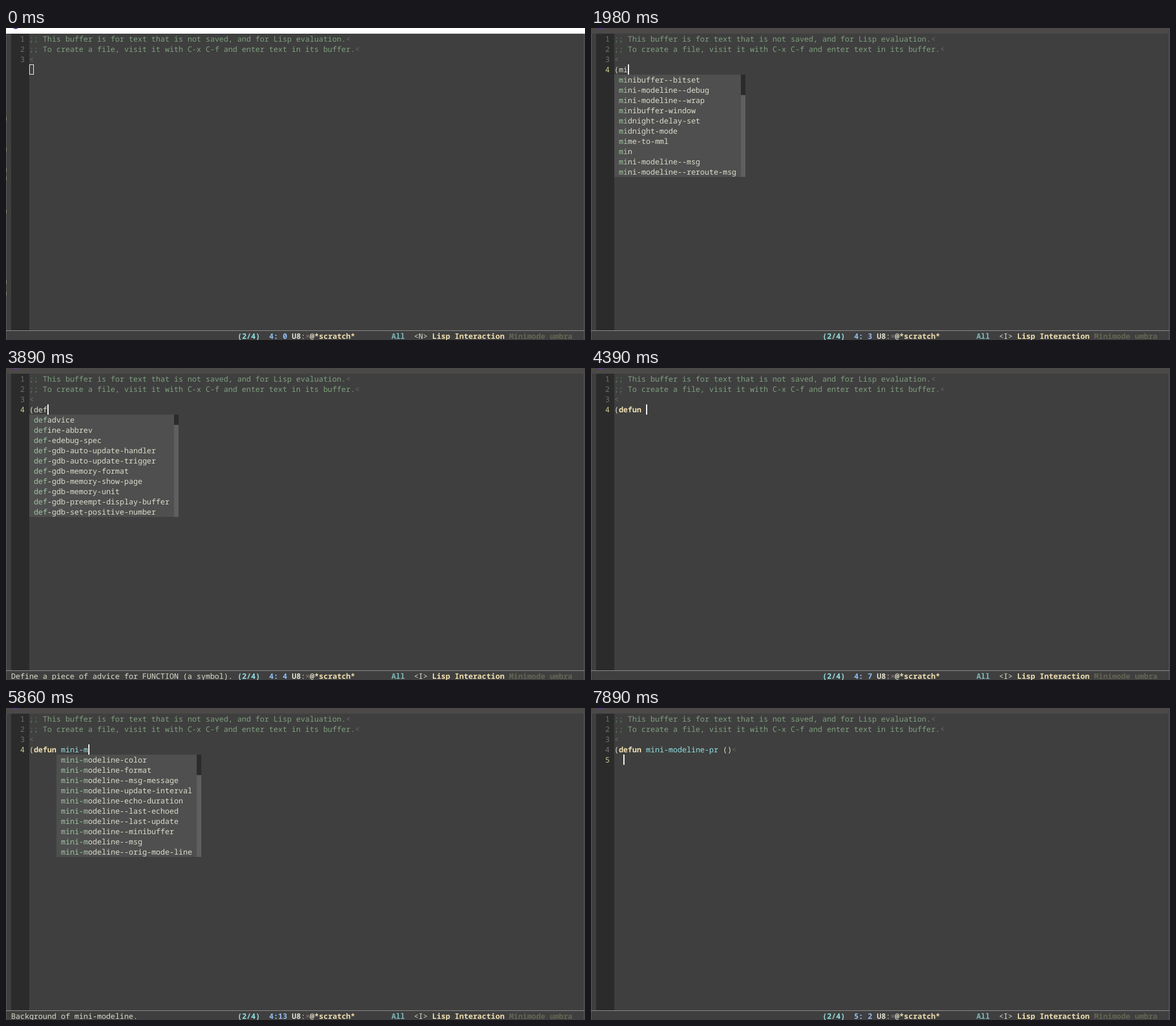
An HTML page that plays this animation: 1020x549 px, repeating every 8 s.

```html
<!DOCTYPE html>
<html lang="en">
<head>
<meta charset="utf-8">
<title>Editor</title>
<style>
  html, body { margin: 0; width: 100%; height: 100%; overflow: hidden; background: #3f3f3f; }
  #stage { position: absolute; left: 0; top: 0; width: 1020px; height: 549px; overflow: hidden; }
  #stage * { position: absolute; }
  #stage span {
    font: 13.29px/18px "Noto Sans Mono", monospace;
    white-space: pre;
    text-rendering: geometricPrecision;
  }
  #stage span.b { font-weight: 700; }
</style>
</head>
<body>
<div id="stage"></div>
<script>
const LOOP = 8000, CELL = 7.975, LEFT = 9, ROW = 18, TOP = 10;
const C = {
  fg: '#dcdccc', dim: '#6f6f6f', eol: '#686b68', comment: '#7f9f7f', delim: '#5f7f5f',
  key: '#f0dfaf', name: '#93e0e3', match: '#9fc59f', line: '#d0d08f', pos: '#94bff3',
  all: '#7cb8bb', minor: '#656555', popup: '#4f4f4f', track: '#5f5f5f', dark: '#2b2b2b'
};

const mm = s => s.split(' ').map(w => w.replace('~', 'mini-modeline-'));
const miFns = mm('minibuffer--bitset ~-debug ~-wrap minibuffer-window midnight-delay-set midnight-mode mime-to-mml min ~-msg ~-reroute-msg');
const minFns = mm('minibuffer--bitset ~-debug ~-wrap minibuffer-window ~-msg ~-reroute-msg ~-set-buffer-background ~-window-divider ~disable ~display');
const defFns = mm('defadvice define-abbrev def-edebug-spec def-gdb-auto-update-handler def-gdb-auto-update-trigger def-gdb-memory-format def-gdb-memory-show-page def-gdb-memory-unit def-gdb-preempt-display-buffer def-gdb-set-positive-number');
const defuns = mm('defun defun-cvs-mode');
const miVars = mm('~color ~format ~-msg-message ~update-interval ~echo-duration midnight-mode ~-last-echoed ~-last-update ~-minibuffer ~-msg');
const miniVars = miVars.filter(w => w !== 'midnight-mode').concat(mm('~-orig-mode-line'));
const truncP = mm('~truncate-p');

const advice = 'Define a piece of advice for FUNCTION (a symbol).';
const defDoc = 'Define NAME as a function.';
const colorDoc = 'Background of mini-modeline.';
const truncDoc = 'Truncates mini-modeline or not.';

// [start, typed text, cursor, popup, message]
const steps = [
  [0, '', 'hollow'],
  [150, '', 'hollow'],
  [220, '', 'block'],
  [1180, '', 'bar'],
  [1520, '('],
  [1840, '(m'],
  [1910, '(mi'],
  [1980, '(mi', 'bar', miFns],
  [2150, '(min', 'bar', minFns],
  [2230, '(mini', 'bar', minFns],
  [3010, '(min', 'bar', minFns],
  [3180, '(mi', 'bar', miFns],
  [3350, '(m'],
  [3520, '('],
  [3660, '(d'],
  [3740, '(de'],
  [3820, '(def'],
  [3890, '(def', 'bar', defFns, advice],
  [4060, '(defu', 'bar', defuns, advice],
  [4140, '(defun', 'bar', defuns, advice],
  [4230, '(defun', 'bar', defuns, defDoc],
  [4390, '(defun '],
  [4940, '(defun m'],
  [5080, '(defun mi'],
  [5150, '(defun mi', 'bar', miVars, colorDoc],
  [5230, '(defun min', 'bar', miniVars, colorDoc],
  [5310, '(defun mini', 'bar', miniVars, colorDoc],
  [5630, '(defun mini-', 'bar', miniVars, colorDoc],
  [5860, '(defun mini-m', 'bar', miniVars, colorDoc],
  [5950, '(defun mini-mo', 'bar', miniVars, colorDoc],
  [6260, '(defun mini-modeline-', 'bar', miniVars, colorDoc],
  [6640, '(defun mini-modeline-p', 'bar', truncP, truncDoc],
  [6720, '(defun mini-modeline-pr', 'bar', null, truncDoc],
  [6800, '(defun mini-modeline-pr'],
  [7270, '(defun mini-modeline-pr '],
  [7500, '(defun mini-modeline-pr ('],
  [7570, '(defun mini-modeline-pr ()'],
  [7890, '(defun mini-modeline-pr ()\n  ']
];

const stage = document.getElementById('stage');
const X = col => LEFT + col * CELL;
const Y = row => TOP + row * ROW;

function box(x, y, w, h, color, extra = '') {
  const el = document.createElement('div');
  el.style.cssText = `left:${x}px;top:${y}px;width:${w}px;height:${h}px;background:${color};${extra}`;
  stage.append(el);
}

function text(col, y, str, color, bold) {
  if (!str) return;
  const el = document.createElement('span');
  el.textContent = str;
  el.style.cssText = `left:${X(col)}px;top:${y}px;color:${color}`;
  if (bold) el.className = 'b';
  stage.append(el);
}

function drawWindow(focused) {
  box(0, 0, 1020, TOP, focused ? '#4b4948' : '#ffffff');
  box(10, -12, 14, 14, focused ? '#6a35b0' : '#7f3fbf', 'border-radius:50%');
  box(0, TOP, 1, 539, '#5c5c5c');
  box(1018, TOP, 1, 539, '#5c5c5c');
  box(LEFT, TOP, 32, 522, C.dark);
  box(0, 532, 1019, 1, '#949494');
  if (!focused) {
    for (const y of [157, 211, 247, 262, 320, 444, 464]) box(0, y, 1, 6, '#a09a80');
  }
}

function drawComments() {
  const lines = [
    'This buffer is for text that is not saved, and for Lisp evaluation.',
    'To create a file, visit it with C-x C-f and enter text in its buffer.'
  ];
  lines.forEach((s, i) => {
    text(4, Y(i), ';;', C.delim);
    text(7, Y(i), s, C.comment);
    text(7 + s.length, Y(i), '<', C.eol);
  });
  text(4, Y(2), '<', C.eol);
  for (let i = 0; i < 3; i++) text(2, Y(i), String(i + 1), C.dim);
}

function drawCode(code, newline) {
  const [, paren, key, name, rest] = code.match(/^(\(?)(\w*)( ?[\w-]*)(.*)$/);
  const isDef = key === 'defun';
  text(4, Y(3), paren, C.fg);
  text(5, Y(3), key, isDef ? C.key : C.fg, isDef);
  text(5 + key.length, Y(3), name, C.name);
  text(5 + key.length + name.length, Y(3), rest, C.fg);
  if (newline) text(4 + code.length, Y(3), '<', C.eol);
}

function drawCursor(kind, col, row) {
  const x = Math.round(X(col)), y = Y(row);
  if (kind === 'hollow') box(x, y, 8, ROW, 'none', 'box-sizing:border-box;border:1px solid #fff');
  else box(x, y, kind === 'block' ? 8 : 2, ROW, '#fff');
}

function drawPopup(list, code) {
  const prefix = code.match(/[\w-]*$/)[0].length;
  const col = 4 + code.length - prefix;
  const wide = Math.max(...list.map(w => w.length));
  const x = Math.round(X(col - 1)), right = Math.round(X(col + wide + 1));
  const h = list.length * ROW;
  box(x, Y(4), right - x, h, C.popup);
  if (list.length === 10) {
    box(right, Y(4), 8, h, C.track);
    box(right, Y(4), 8, list === defFns ? ROW : 2 * ROW, C.dark);
  }
  list.forEach((word, i) => {
    const n = list.length === 1 ? word.length : prefix;
    text(col, Y(4 + i), word.slice(0, n), C.match);
    text(col + n, Y(4 + i), word.slice(n), C.fg);
  });
}

function drawModeline(line, col, mode, msg) {
  const y = 533;
  const put = (c, s, color, bold = true) => text(c, y, s, color, bold);
  put(0, msg, C.fg, false);
  put(50, '(2/4)', C.name);
  put(57, line + ':' + String(col).padStart(2), C.pos);
  put(62, 'U8', C.fg);
  put(64, ':', C.fg, false);
  put(65, '×', '#9c7777', false);
  put(66, '@', C.fg);
  put(67, '*scratch*', C.key);
  put(84, 'All', C.all);
  put(89, `<${mode}>`, C.fg, false);
  put(93, 'Lisp Interaction', C.key);
  put(110, 'Minimode umbra', C.minor);
}

function draw([start, typed, cursor = 'bar', list, msg]) {
  const [code, next] = typed.split('\n');
  const newline = next !== undefined;
  const col = newline ? next.length : code.length;
  stage.replaceChildren();
  drawWindow(start > 0);
  drawComments();
  if (code) text(2, Y(3), '4', newline ? C.dim : C.line);
  if (newline) text(2, Y(4), '5', C.line);
  drawCode(code, newline);
  if (list) drawPopup(list, code);
  drawCursor(cursor, 4 + col, newline ? 4 : 3);
  drawModeline(newline ? 5 : 4, col, cursor === 'bar' ? 'I' : 'N', msg);
}

const begin = performance.now();
let shown;
function tick() {
  const t = (performance.now() - begin) % LOOP;
  const step = steps.findLast(s => s[0] <= t);
  if (step !== shown) draw(shown = step);
  requestAnimationFrame(tick);
}
tick();
</script>
</body>
</html>
```
